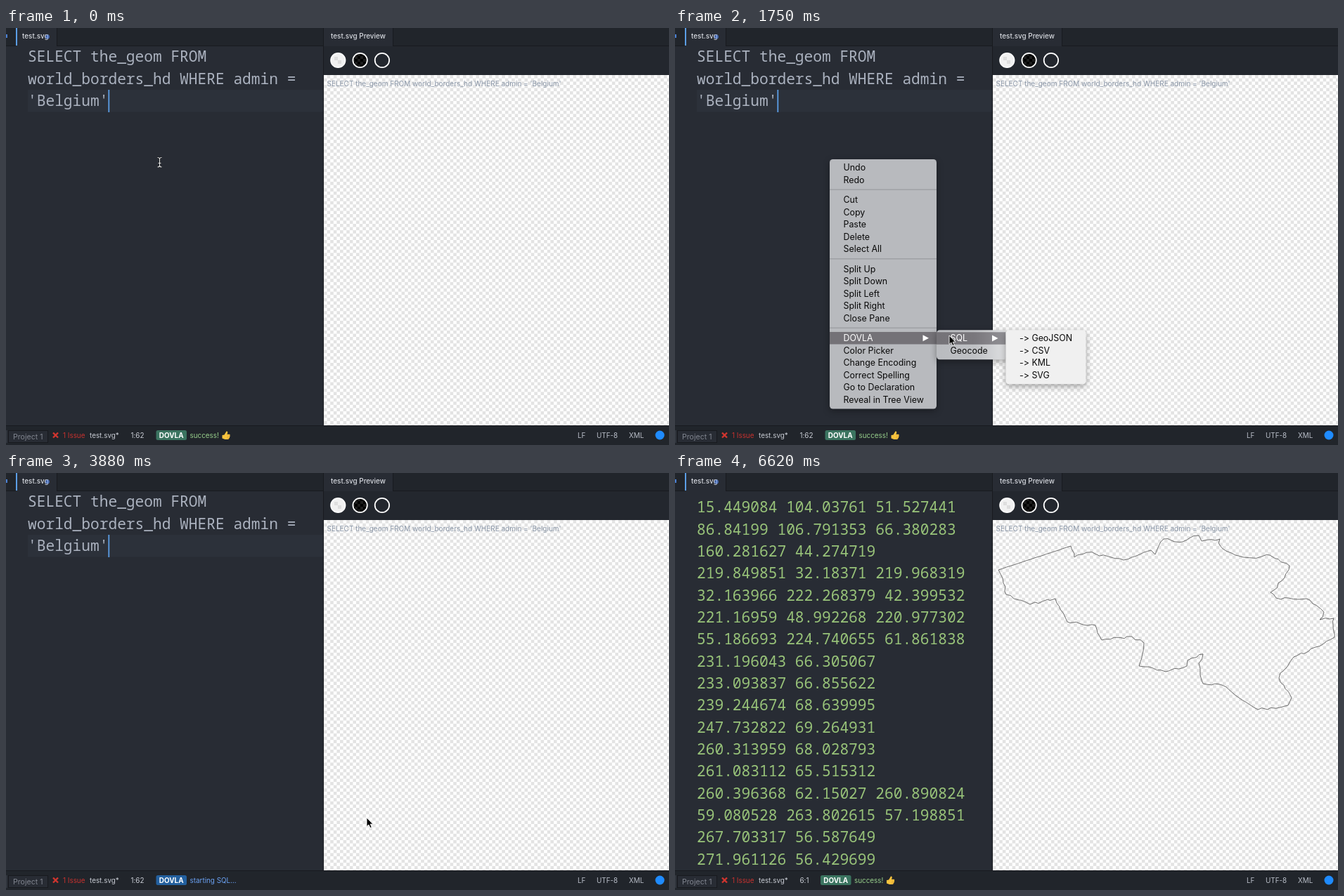
An HTML page that plays this animation: 943x594 px, repeating every 7.16 s.

```html
<!DOCTYPE html>
<html lang="en">
<head>
<meta charset="utf-8">
<title>SQL to SVG in the editor</title>
<style>
html, body { margin: 0; width: 100%; height: 100%; overflow: hidden; background: #282c34; }
svg { display: block; font-family: Inter, Roboto, sans-serif; font-variant-ligatures: none; font-feature-settings: "calt" 0; }
.code { font: 500 21.2px "Noto Sans Mono", "DejaVu Sans Mono", monospace; }
.ui { font-size: 9.9px; }
.menu { font-size: 12.4px; filter: drop-shadow(0 3px 5px rgba(0, 0, 0, .35)); }
</style>
</head>
<body>
<svg id="stage" width="943" height="594" viewBox="0 0 943 594">
  <defs>
    <pattern id="check" x="452" y="67.1" width="9.21" height="9.21" patternUnits="userSpaceOnUse" viewBox="0 0 2 2">
      <path d="M0 0h2v2H0z" fill="#fff"/><path d="M1 0h1v1H1zM0 1h1v1H0z" fill="#e3e3e3"/>
    </pattern>
    <pattern id="dark" width="8" height="8" patternUnits="userSpaceOnUse">
      <path d="M0 0h8v8H0z" fill="#000"/><path d="M0 0h4v4H0zM4 4h4v4H4z" fill="#1c1c1c"/>
    </pattern>
    <linearGradient id="panel"><stop stop-color="#b9bbbf"/><stop offset=".55" stop-color="#bfc1c4"/><stop offset="1" stop-color="#dedfe1"/></linearGradient>
    <linearGradient id="bar"><stop stop-color="#757378"/><stop offset=".55" stop-color="#79777c"/><stop offset="1" stop-color="#929196"/></linearGradient>
  </defs>
</svg>
<script>
const LOOP = 7160, FRAME = 89, ROW = 17.5;
const stage = document.getElementById('stage');

function el(tag, attrs, parent = stage, text) {
  const node = document.createElementNS('http://www.w3.org/2000/svg', tag);
  for (const k in attrs) node.setAttribute(k, attrs[k]);
  if (text !== undefined) node.textContent = text;
  return parent.appendChild(node);
}
const group = (cls = '', parent) => el('g', { class: cls }, parent);
const rect = (x, y, width, height, fill, parent, more) =>
  el('rect', { x, y, width, height, fill, ...more }, parent);
const label = (x, y, text, fill, parent, more) => el('text', { x, y, fill, ...more }, parent, text);
const path = (d, attrs, parent) => el('path', { d, ...attrs }, parent);
const show = (node, on) => node.setAttribute('visibility', on ? 'visible' : 'hidden');

// Editor
const lines = (text, y, color, parent) =>
  text.split('\n').forEach((s, i) => label(31, y + i * 31.33, s, color, parent));
rect(0, 0, 452, 594, '#282c34');
const query = group('code');
rect(31, 88, 420, 31.5, '#2c313a', query);
lines(`SELECT the_geom FROM
world_borders_hd WHERE admin =
'Belgium'`, 48.3, '#abb2bf', query);
const caret = rect(145.4, 88, 1.8, 32, '#5b9ee6');

const coords = group('code');
lines(`15.449084 104.03761 51.527441
86.84199 106.791353 66.380283
160.281627 44.274719
219.849851 32.18371 219.968319
32.163966 222.268379 42.399532
221.16959 48.992268 220.977302
55.186693 224.740655 61.861838
231.196043 66.305067
233.093837 66.855622
239.244674 68.639995
247.732822 69.264931
260.313959 68.028793
261.083112 65.515312
260.396368 62.15027 260.890824
59.080528 263.802615 57.198851
267.703317 56.587649
271.961126 56.429699`, 56.4, '#98c379', coords);

// Tab bars
const tabs = group('ui');
rect(0, 0, 943, 25, '#21252b', tabs);
rect(0, 25, 943, 1, '#181a1f', tabs);
rect(14, 0, 58, 26, '#282c34', tabs);
rect(14, 0, 2, 25, '#5b9ee6', tabs);
rect(72, 0, 1, 25, '#181a1f', tabs);
rect(0, 9, 2, 5, '#4a7fd0', tabs);
label(23, 15, 'test.svg', '#d7dae0', tabs, { 'font-weight': 500 });
el('circle', { cx: 59, cy: 12.5, r: 3, fill: '#568af2', opacity: .6 }, tabs);

// Preview pane
const preview = group('ui');
rect(452, 0, 98, 26, '#282c34', preview);
rect(550, 0, 1, 25, '#181a1f', preview);
rect(452, 26, 491, 41, '#23272e', preview);
label(462, 15, 'test.svg Preview', '#d7dae0', preview, { 'font-weight': 500 });
['#f1f1f1', 'url(#dark)', 'none'].forEach((fill, i) =>
  el('circle', { cx: 472.3 + i * 31.3, cy: 46, r: 10.2, fill, stroke: '#fff', 'stroke-width': 1.8 }, preview));
path('M467 41h5v5h-5zM472 46h5v5h-5z', { fill: '#dedede' }, preview);
rect(452, 67, 491, 500, 'url(#check)', preview);
label(456.5, 83, "SELECT the_geom FROM world_borders_hd WHERE admin = 'Belgium'", '#8b97a8', preview,
  { 'font-size': 10 });
rect(451, 0, 1, 567, '#181a1f', preview);

// Country outline: key corners, with all sides but the coast roughened by a seeded wiggle
const corners = [
  460,138, 563,104, 568,120, 586,113, 638,124, 677,110, 683,116, 695,94, 722,98, 745,89,
  749,97, 775,94, 775,103, 797,117, 822,121, 846,117, 874,132, 867,149, 847,170, 855,178,
  903,181, 923,198, 917,209, 937,207, 938,234, 901,254, 880,262, 859,292, 877,320, 872,331,
  829,337, 806,323, 778,302, 751,300, 745,271, 751,258, 729,267, 728,275, 698,283, 660,275,
  667,242, 650,233, 607,238, 598,217, 558,212, 541,179, 505,187, 471,173, 466,150
];
function outline(p) {
  let seed = 7, d = `M${p[0]} ${p[1]}`;
  const rnd = () => (seed = seed * 16807 % 2147483647) / 2147483647 - .5;
  for (let i = 2; i <= p.length; i += 2) {
    const x = p[i - 2], y = p[i - 1], dx = p[i % p.length] - x, dy = p[(i + 1) % p.length] - y;
    const n = Math.max(1, Math.round(Math.hypot(dx, dy) / 6)), rough = i > 2 ? 3.4 : .5;
    for (let k = 1; k <= n; k++) {
      const w = k < n ? rough : 0;
      d += `L${(x + dx * k / n + rnd() * w).toFixed(1)} ${(y + dy * k / n + rnd() * w).toFixed(1)}`;
    }
  }
  return d + 'Z';
}
const country = path(outline(corners),
  { fill: 'none', stroke: '#4c4c4c', 'stroke-width': .8, 'stroke-linejoin': 'round' });

// Status bar
const status = group('ui');
rect(0, 567, 943, 27, '#21252b', status);
rect(0, 566, 943, 1, '#181a1f', status);
rect(0, 573, 2, 18, '#30353d', status);
rect(3.5, 573.5, 56, 17, '#282c34', status, { stroke: '#181a1f' });
label(10, 586, 'Project 1', '#80858f', status, { 'font-size': 10.6 });
path('M67 576.5l7 7m0-7l-7 7', { stroke: '#d0352f', 'stroke-width': 2.4 }, status);
label(81, 584, '1 Issue', '#c8322f', status);
label(119, 584, 'test.svg*', '#c9cdd5', status);
label(813, 584, 'LF', '#b9bec8', status);
label(840, 584, 'UTF-8', '#b9bec8', status);
label(886, 584, 'XML', '#b9bec8', status);
el('circle', { cx: 930, cy: 580, r: 6.5, fill: '#1f8bff' }, status);

function report(place, x, fill, message, color, done) {
  const g = group('', status);
  label(177.5, 584, place, '#c9cdd5', g);
  rect(x, 573, 43.5, 14, fill, g, { rx: 2.5 });
  label(x + 21.7, 583.7, 'DOVLA', '#fff', g, { 'font-weight': 700, 'text-anchor': 'middle' });
  label(x + 48, 584, message, color, g);
  if (done) {
    const thumb = el('g', { transform: `translate(${x + 94} 574)` }, g);
    path('M0 6l3-.5 3-5q2-.6 1.7 2L7 4.7h3.5q1.5 1 .3 2.1 1 1.1-.3 2 .5 1.2-.8 1.8 0 1.200-1.4 1.3H4L0 10.5z',
      { fill: '#f8c33e' }, thumb);
    path('M7 6.8h3.4M7 8.8h3M6.5 10.6h2.8', { stroke: '#d5952a', 'stroke-width': .5 }, thumb);
  }
  return g;
}
const ready = report('1:62', 213.5, '#3b7460', 'success!', '#98d08c', true);
const running = report('1:62', 213.5, '#23609f', 'starting SQL...', '#6ba2f5');
const finished = report('6:1', 207, '#3b7460', 'success!', '#98d08c', true);

// Context menus
const menus = group();
const disabled = ['Copy', 'Delete'];
function makeMenu(x, y, w, h, fill, bar, items) {
  const g = group('menu', menus), rows = [];
  rect(x, y, w, h, fill, g, { rx: 4.5 });
  let mid = y + 11.7;
  for (const name of items) {
    if (!name) {
      rect(x, mid - 4.2, w, 1.5, '#9fa1a5', g);
      mid += 11;
      continue;
    }
    const back = rect(x, mid - ROW / 2, w, ROW, bar, g);
    const text = label(x + 19.5, mid + 4.4, name, '#000', g);
    const arrow = /^(DOVLA|SQL)$/.test(name) &&
      path(`M${x + w - 19.5} ${mid - 4.5}l8.5 4.5-8.5 4.5z`, {}, g);
    rows.push({ name, mid, back, text, arrow });
    mid += ROW;
  }
  return {
    g,
    hover: p => p.x > x && p.x < x + w && rows.find(r => Math.abs(p.y - r.mid) <= ROW / 2)?.name,
    mark(picked, ghost) {
      for (const { name, back, text, arrow } of rows) {
        const on = name === picked, ink = on ? '#fff' : '#0a0a0a';
        back.setAttribute('opacity', on ? 1 : 0);
        text.setAttribute('fill', ghost && disabled.includes(name) ? '#9b9da2' : ink);
        if (arrow) arrow.setAttribute('fill', ink);
      }
    }
  };
}
const main = makeMenu(220, 187, 152, 355.5, '#b8babe', '#747277', [
  'Undo', 'Redo', '', 'Cut', 'Copy', 'Paste', 'Delete', 'Select All', '',
  'Split Up', 'Split Down', 'Split Left', 'Split Right', 'Close Pane', '',
  'DOVLA', 'Color Picker', 'Change Encoding', 'Correct Spelling', 'Go to Declaration', 'Reveal in Tree View'
]);
const sub = makeMenu(372, 430.3, 98.5, 42, 'url(#panel)', 'url(#bar)', ['SQL', 'Geocode']);
const list = makeMenu(470.5, 430.3, 114, 77, '#f0f0f0', '#a2a1a6',
  ['GeoJSON', 'CSV', 'KML', 'SVG'].map(s => '-> ' + s));

// Pointers
const beam = group();
for (const [stroke, width] of [['#15171b', 2.4], ['#e8e8e8', 1.1]])
  path('M215.5 184.5q3 0 3 2v9.5q0 2-3 2M221.5 184.5q-3 0-3 2v9.5q0 2 3 2M216.5 192.5h4',
    { fill: 'none', stroke, 'stroke-width': width }, beam);
const arrow = path('M0 0V12.6L2.9 10 5 14.6 7.2 13.6 5.2 9.2H9Z',
  { fill: '#000', stroke: '#fff', 'stroke-width': .9 });

// Pointer legs: start time, frames, bend point, end point
const legs = [
  [0, 1, 219, 190, 219, 190],
  [510, 6, 396, 398, 321, 437],
  [1490, 4, 372, 441, 390, 438],
  [1930, 9, 495, 438, 511, 476],
  [2730, 2, 513, 492, 513, 491],
  [5040, 1, 526, 491, 540, 490],
  [5130, 5, 690, 560, 799, 318],
  [5560, 2, 780, 288, 715, 291],
  [5830, 6, 707, 292, 924, 554],
  [6530, 2, 932, 572, 960, 600]
];
// Pointer position at time t, lag frames behind; each leg is a quadratic curve
function pointer(t, lag = 0) {
  const i = legs.findLastIndex(leg => leg[0] <= t);
  const [start, frames, bx, by, ex, ey] = legs[i];
  const [sx, sy] = legs[Math.max(0, i - 1)].slice(4);
  const step = Math.min(frames, 1 + Math.floor((t - start + 8) / FRAME));
  const u = (step - lag) / frames;
  const bend = (a, b, c) => a * (1 - u) ** 2 + 2 * b * u * (1 - u) + c * u * u;
  return { x: bend(sx, bx, ex), y: bend(sy, by, ey) };
}

const begin = performance.now();
function draw() {
  const t = (performance.now() - begin) % LOOP;
  const within = (a, b) => t >= a && t < b;
  const { x, y } = pointer(t), late = pointer(t, .2);
  show(beam, t < 90);
  show(arrow, t >= 90);
  arrow.setAttribute('transform', `translate(${x} ${y})`);

  show(query, t < 4150);
  show(caret, t < 4150 && !within(3710, 3880));
  show(coords, t >= 4150);
  show(country, t >= 4320);
  show(ready, t < 3710);
  show(running, within(3710, 4150));
  show(finished, t >= 4150);

  show(main.g, within(240, 3530));
  show(sub.g, within(1130, 3530));
  show(list.g, within(1750, 3530));
  sub.g.setAttribute('opacity', t < 1220 ? .6 : 1);
  menus.setAttribute('opacity', t < 3450 ? 1 : .45);
  main.mark(t < 1130 ? main.hover(late) : 'DOVLA', within(510, 960));
  sub.mark(late.x > 372 ? 'SQL' : '');
  list.mark(within(3360, 3450) ? '' : list.hover(late));
  requestAnimationFrame(draw);
}
draw();
</script>
</body>
</html>
```
